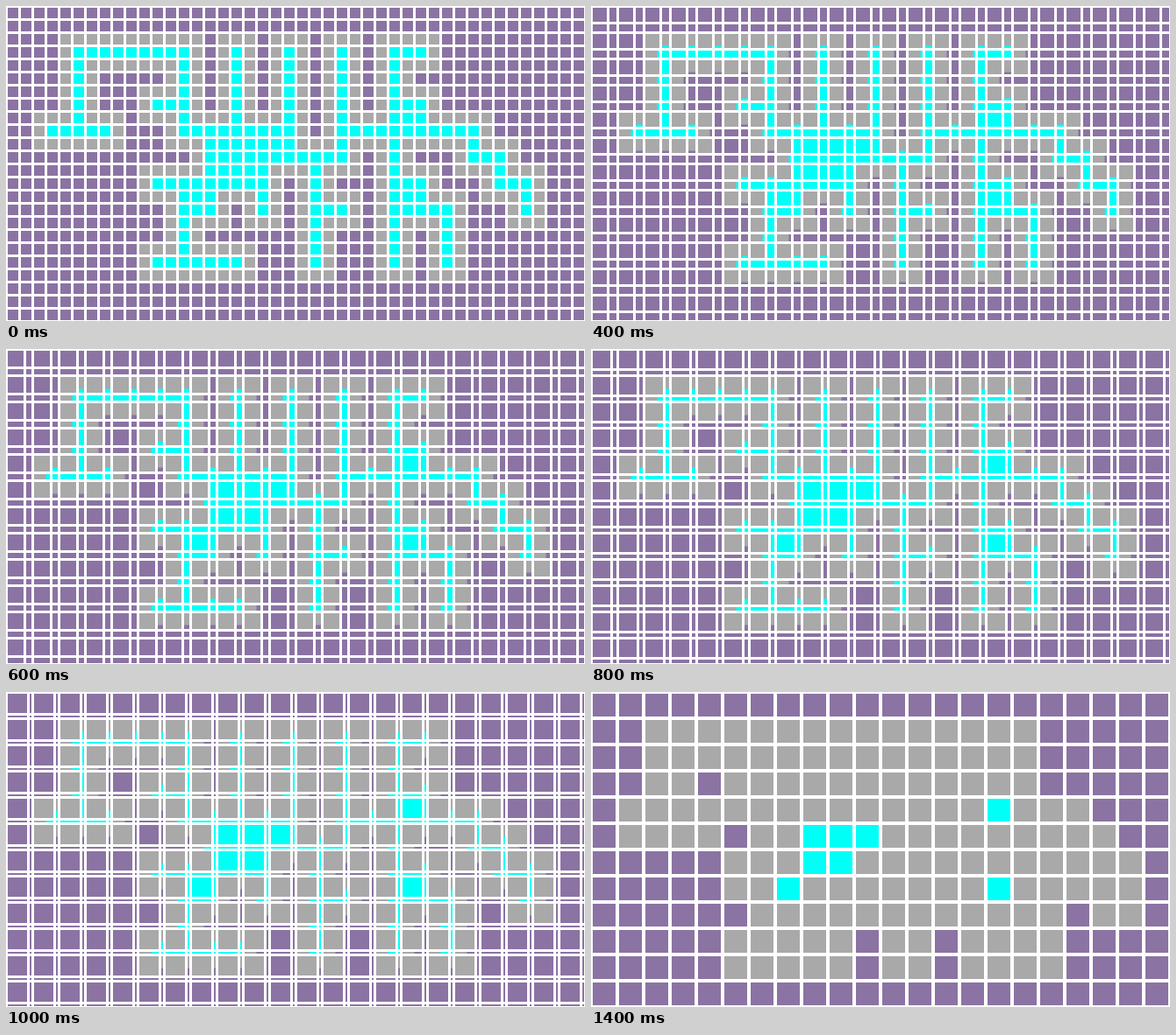
An HTML page with a canvas for the animation above (2200 ms loop, 660 by 360 pixels).

```html
<!DOCTYPE html>
<html>
<head>
<meta charset="utf-8">
<title>Grid coarsening</title>
<style>
html, body { margin: 0; width: 660px; height: 360px; overflow: hidden; background: #fff; }
canvas { display: block; }
</style>
</head>
<body>
<canvas id="stage" width="660" height="360"></canvas>
<script>
const ctx = document.getElementById('stage').getContext('2d');
const CELL = 15, COLS = 44, ROWS = 24;
const CYAN = '#00fff7', GREY = '#a9a9a9', PURPLE = '#8b73a3';

// The figure is built from bars whose ends lie on every second cell
const bars = [];
const block = (x0, y0, x1, y1) => bars.push([x0, y0, x1, y1].map(n => 2 * n + 1));
const row = (y, x0, x1) => block(x0, y, x1, y);
const column = (x, y0, y1) => block(x, y0, x, y1);

function buildFigure() {
  // Upright strokes, with the hook on the left
  for (let x = 6; x <= 14; x += 2) column(x, 1, 4);
  column(2, 1, 4);
  row(1, 2, 6);
  row(1, 14, 15);
  row(3, 5, 6);
  row(4, 1, 3);

  // Body, narrowing downwards
  row(4, 6, 7);
  for (let i = 0; i < 2; i++) block(7, 4 + i, 10 - i, 5 + i);
  row(5, 7, 12);
  column(12, 4, 5);
  row(4, 12, 16);
  row(6, 5, 9);
  column(9, 6, 7);
  block(6, 6, 7, 7);
  for (const y of [3, 6]) block(14, y, 15, y + 1);

  // Legs and feet
  column(6, 6, 9);
  column(11, 5, 9);
  column(14, 4, 9);
  column(16, 7, 9);
  row(9, 5, 8);
  row(7, 11, 12);
  row(7, 14, 16);

  // Stepped tail
  for (let i = 0; i < 3; i++) {
    row(4 + i, 16 + i, 17 + i);
    column(17 + i, 4 + i, 5 + i);
  }
}

// True if a bar reaches within `reach` cells of (x, y)
const near = (x, y, reach) => bars.some(([x0, y0, x1, y1]) =>
  x >= x0 - reach && x <= x1 + reach && y >= y0 - reach && y <= y1 + reach);

buildFigure();
const cells = [];
for (let y = 0; y < ROWS; y++) {
  for (let x = 0; x < COLS; x++) {
    cells.push({ x, y, color: near(x, y, 0) ? CYAN : near(x, y, 1) ? GREY : PURPLE });
  }
}
const kept = cells.filter(({ x, y }) => x % 2 === 0 && y % 2 === 0);

function fillCells(list, size) {
  for (const { x, y, color } of list) {
    ctx.fillStyle = color;
    ctx.fillRect(x * CELL, y * CELL, size, size);
  }
}

function draw(grow) {
  // Cell edges lie on pixel centres; the extra pixel hides seams
  ctx.setTransform(1, 0, 0, 1, 0.5, 0.5);
  fillCells(cells, CELL + 1);
  fillCells(kept, CELL + grow);
  ctx.fillStyle = '#fff';
  for (let p = 0; p <= 660; p += 2 * CELL) {
    for (const line of [p, p + CELL + grow]) {
      ctx.fillRect(line - 1.5, -1, 3, 362);
      ctx.fillRect(-1, line - 1.5, 662, 3);
    }
  }
}

function tick() {
  const time = performance.now() % 2200;
  draw(Math.min(14, Math.floor(time / 100)));
  requestAnimationFrame(tick);
}
tick();
</script>
</body>
</html>
```
